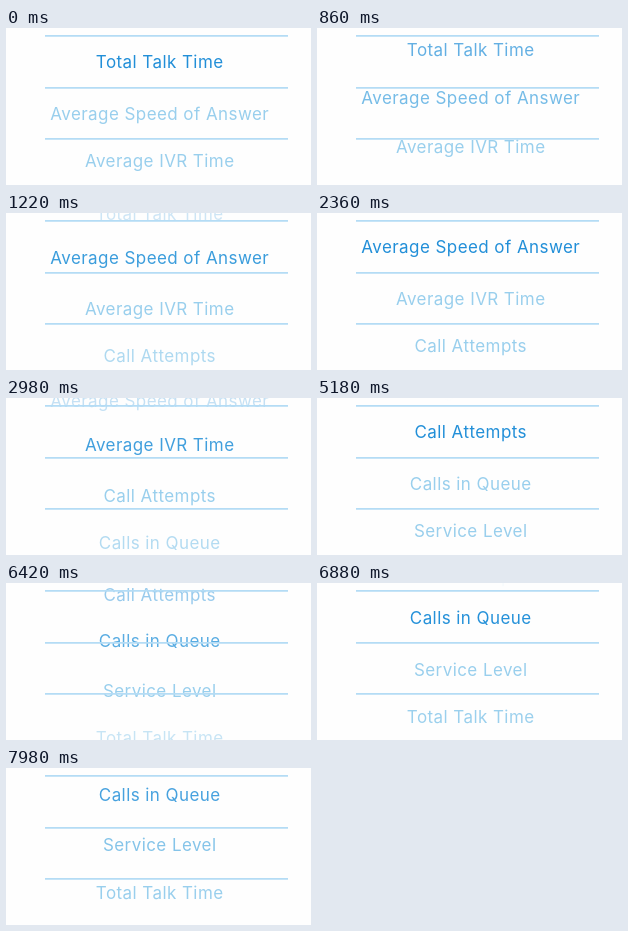
Write an HTML page that moves like this. It is 305x157 px and loops after 8000 ms.

```html
<!DOCTYPE html>
<html lang="en">
<head>
<meta charset="utf-8">
<style>
  html, body { margin: 0; width: 100%; height: 100%; overflow: hidden; background: #fefefe; }
  svg { display: block; width: 100%; height: 100%; }
  text { font: 400 17px Inter, "Open Sans", sans-serif; letter-spacing: .43px; text-anchor: middle; }
  path { stroke: #b4dcf5; stroke-width: 1.8; }
</style>
</head>
<body>
<svg viewBox="0 0 305 157">
  <g id="list"></g>
  <path d="M39 7.8H282M39 59.8H282M39 110.8H282"/>
</svg>
<script>
const labels = ["Total Talk Time", "Average Speed of Answer", "Average IVR Time",
  "Call Attempts", "Calls in Queue", "Service Level"];
const LOOP = 8000, STEP = 1800, START = 680, MOVE = 940;
const baselines = [-1.5, 39.8, 91.8, 139, 186.5]; // slots -1 to 3
const dark = [34, 143, 216], light = [153, 207, 237];

const mix = (a, b, p) => a + (b - a) * p;
const clamp = x => Math.min(1, Math.max(0, x));

const items = labels.map(label => {
  const el = document.createElementNS("http://www.w3.org/2000/svg", "text");
  el.textContent = label;
  list.append(el);
  return el;
});

function scroll(t) {
  const k = Math.floor((t - START) / STEP);
  const x = clamp((t - START - k * STEP) / MOVE);
  return k + Math.sin(x * Math.PI / 2);
}

function draw(now) {
  const pos = scroll(now % LOOP), n = items.length;
  items.forEach((el, i) => {
    const u = (i - pos + 1 + n) % n; // 0 leaves at the top, 4 waits below
    const j = Math.min(3, Math.floor(u));
    const y = mix(baselines[j], baselines[j + 1], Math.min(1, u - j));
    const rgb = dark.map((c, m) => Math.round(mix(c, light[m], clamp(u - 1))));
    el.setAttribute("transform", `translate(153.7 ${y.toFixed(2)})`);
    el.setAttribute("fill", `rgb(${rgb})`);
    el.setAttribute("opacity", Math.min(clamp(u), clamp(4 - u)));
  });
  requestAnimationFrame(draw);
}
requestAnimationFrame(draw);
</script>
</body>
</html>
```
